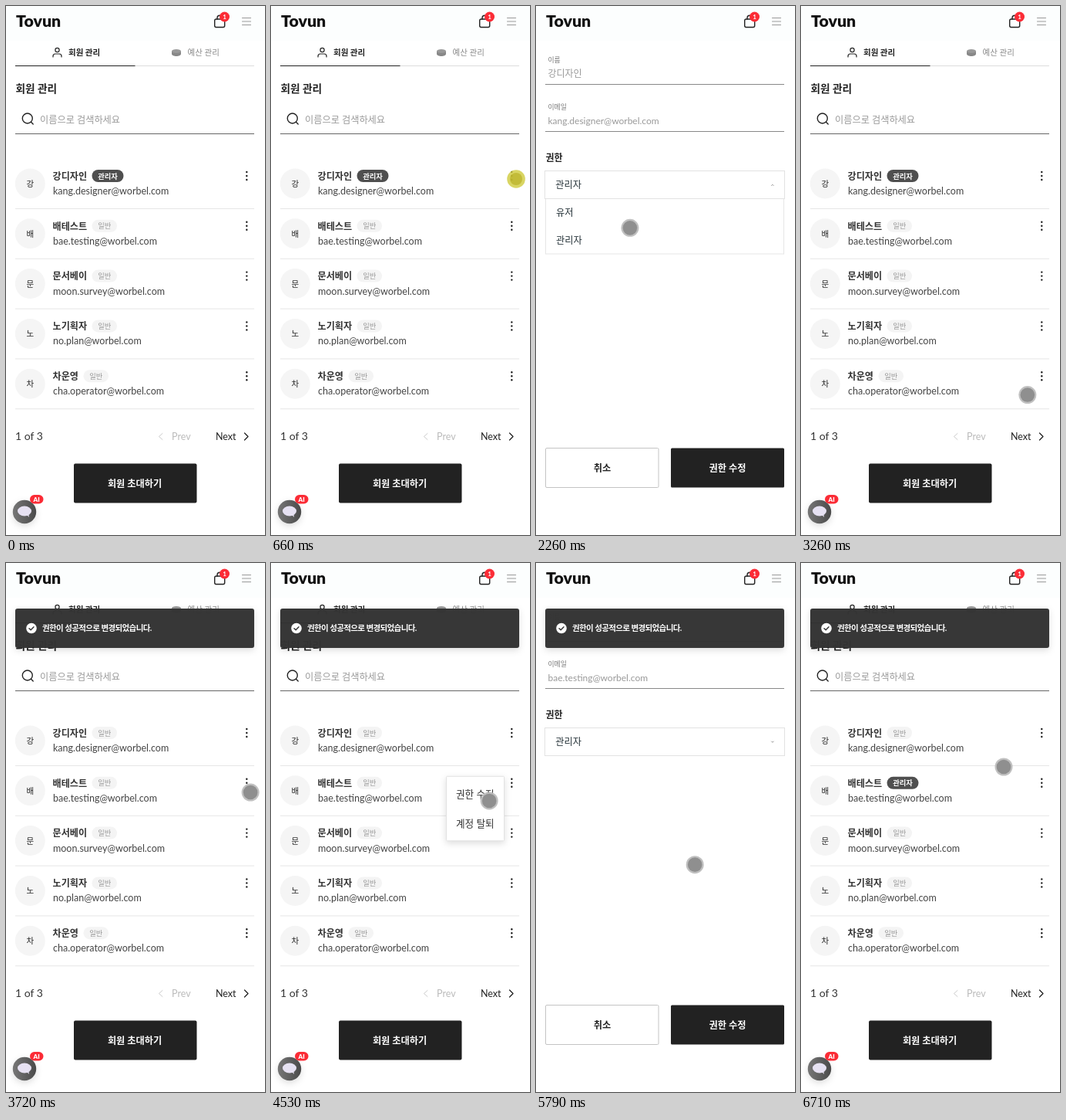
Recreate the animation shown at these times as an HTML page. Size 336 by 685 pixels, loop 7250 ms.

```html
<!DOCTYPE html>
<html lang="ko">
<head>
<meta charset="utf-8">
<title>회원 관리</title>
<style>
html, body { margin: 0; width: 100%; height: 100%; overflow: hidden; background: #fff; }
svg { display: block; width: 100vw; height: 100vh; }
text { font-family: Lato, "Noto Sans CJK KR", "Noto Sans CJK", sans-serif; white-space: pre; }
.soft { filter: drop-shadow(0 3px 4px #0002); }
</style>
</head>
<body>
<svg id="stage" viewBox="0 0 336 685" preserveAspectRatio="none"></svg>
<script>
const LOOP = 7250, TICK = 1000 / 15, PHASE = 188, ROW = 64.8;
const PRESS = 140, SAVE = 340; // length of a click, delay until a new role shows
const ADMIN = '관리자', USER = '유저';
const members = [
  ['강디자인', 'kang.designer'],
  ['배테스트', 'bae.testing'],
  ['문서베이', 'moon.survey'],
  ['노기획자', 'no.plan'],
  ['차운영', 'cha.operator'],
];
const email = i => members[i][1] + '@worbel.com';

// Pointer stops; all but the first and last are clicks.
// Each visit clicks: dots, menu item, select, option, submit.
const stops = [
  [188, 330, 300],
  [600, 318, 224], [1230, 283, 238], [1860, 236, 240], [2440, 118, 289], [2837, 283, 600],
  [4130, 318, 289], [4670, 283, 308], [5080, 230, 240], [5565, 174, 303], [6060, 283, 600],
  [6900, 263, 264],
];
const clickEnds = stops.slice(1, -1).map(([at]) => at + PRESS);
const saves = clickEnds.filter((_, i) => i % 5 === 4).map(at => at + SAVE);
const countPast = (times, t) => times.filter(at => at <= t).length;
const clamp = v => Math.max(0, Math.min(1, v));
const ease = v => v * v * (3 - 2 * v);

const text = (x, y, s, size, fill = '#222', weight = 400, more = '') =>
  `<text x="${x}" y="${y}" font-size="${size}" fill="${fill}" font-weight="${weight}" ${more}>${s}</text>`;
const centred = (x, y, s, size, fill, weight) =>
  text(x, y, s, size, fill, weight, 'text-anchor="middle"');
const rect = (x, y, w, h, fill, r = 0, more = '') =>
  `<rect x="${x}" y="${y}" width="${w}" height="${h}" rx="${r}" fill="${fill}" ${more}/>`;
const circle = (x, y, r, fill, more = '') =>
  `<circle cx="${x}" cy="${y}" r="${r}" fill="${fill}" ${more}/>`;
const line = (d, stroke, width = 1) =>
  `<path d="${d}" fill="none" stroke="${stroke}" stroke-width="${width}" stroke-linecap="round" stroke-linejoin="round"/>`;
const rule = (y, colour, x2 = 322) => rect(12, y, x2 - 12, 1, colour);

const header = () =>
  rect(0, 0, 336, 45, '#fcfefe') +
  text(13, 27, 'Tovun', 21.3, '#111', 900) +
  rect(270.7, 17, 13, 10.5, 'none', 2, 'stroke="#222" stroke-width="1.4"') +
  line('M274 17v-1.5a3.2 3.2 0 0 1 6.4 0v1.5', '#222', 1.4) +
  circle(283.5, 14, 6.5, '#fb2c36') +
  centred(283.5, 16.7, '1', 8, '#fff', 700) +
  line('M306.5 15.500h11M306.5 20h11M306.5 24.5h11', '#999', 1.1);

function badge(x, y, admin) {
  const w = admin ? 41 : 32.5;
  return rect(x, y, w, 16, admin ? '#4f4f4f' : '#f4f4f4', 8) +
    centred(x + w / 2, y + 11.5, admin ? ADMIN : '일반', 9.3, admin ? '#fff' : '#999', admin ? 700 : 400);
}

function memberRow(i, admin) {
  const y = 230 + ROW * i, name = members[i][0];
  return circle(31.3, y, 19.5, '#f5f5f5') +
    centred(31.3, y + 4, name[0], 10.5) +
    text(60.5, y - 5.3, name, 12.1, '#333', 700) +
    badge(name.length > 3 ? 111.5 : 100.5, y - 18, admin) +
    text(61, y + 14, email(i), 12.5, '#444') +
    [-15, -10, -5].map(d => circle(312.3, y + d, 1.2, '#222')).join('') +
    rule(y + 32, '#e6e6e6');
}

const tabs = () =>
  circle(66.5, 57, 2.6, 'none', 'stroke="#222" stroke-width="1.2"') +
  line('M61 66v-1a3 3 0 0 1 3-3h5a3 3 0 0 1 3 3v1', '#222', 1.2) +
  text(81, 64, '회원 관리', 10.5, '#222', 700) +
  '<path d="M215 58.500v3.500c0 4 12 4 12 0v-3.500z" fill="#888"/><ellipse cx="221" cy="58.500" rx="6" ry="2.600" fill="#999"/>' +
  text(235.5, 64, '예산 관리', 10.5, '#888') +
  rule(77, '#ddd') + rule(77, '#222', 167.5);

const search = () =>
  circle(27.8, 145.5, 6.5, 'none', 'stroke="#222" stroke-width="1.4"') +
  line('M32.5 150.2l2.7 2.7', '#222', 1.4) +
  text(44, 151.5, '이름으로 검색하세요', 12.2, '#999') +
  rule(165, '#666');

const pager = () =>
  text(12, 562, '1 of 3', 14, '#333') +
  line('M203 553.5l-4.500 4 4.500 4', '#ccc') +
  text(215, 562, 'Prev', 12.5, '#bbb') +
  text(272, 562, 'Next', 12.5) +
  line('M309.5 553l4.500 4.500-4.500 4.500', '#222', 1.3);

const chat = () =>
  `<g class="soft">${circle(24, 655, 15.2, 'url(#chat)')}</g>` +
  '<ellipse cx="24" cy="654" rx="9" ry="6.500" fill="#e6e1f2"/>' +
  '<path d="M26 658l4 4-1-6z" fill="#e6e1f2"/>' +
  rect(31, 633, 17.5, 11.5, '#fb2c36', 5.7) +
  centred(39.7, 641.7, 'AI', 8, '#fff', 900);

const listPage = saved =>
  tabs() +
  text(12.5, 111.5, '회원 관리', 13.7, '#222', 700) +
  search() +
  members.map((_, i) => memberRow(i, i === 0 ? saved < 1 : i === 1 && saved > 1)).join('') +
  pager() +
  rect(88, 592.5, 159.5, 51, '#222', 2) +
  centred(167, 622.5, '회원 초대하기', 12.2, '#fff', 700) +
  chat();

function menu(row) {
  const y = 211.5 + ROW * row;
  return `<g class="soft">${rect(227.5, y, 75, 83.5, '#fff', 1, 'stroke="#e2e2e2"')}</g>` +
    text(240, y + 27.5, '권한 수정', 12.6, '#333') +
    text(240, y + 65.5, '계정 탈퇴', 12.6, '#333');
}

function editPage(i, role, open) {
  const ink = '#253238';
  const field = (y, label, value) =>
    text(15.5, y, label, 8.8, '#777') + text(15.5, y + 18.5, value, 12, '#999') + rule(y + 28, '#888');
  const options = () =>
    rect(12.5, 249.5, 309, 71.5, '#fff', 0, 'stroke="#e6e6e6"') +
    text(26, 272, USER, 12.2, ink) + text(26, 308, ADMIN, 12.2, ink);
  return field(73, '이름', members[i][0]) +
    field(134, '이메일', email(i)) +
    text(12.5, 200.5, '권한', 12, '#222', 700) +
    (open ? options() : '') +
    rect(11.5, 213.5, 311, 36, '#fff', 0, 'stroke="#e2e2e2"') +
    text(25.3, 235.8, role, 12.2, ink) +
    line(open ? 'M305.5 232.5l1.300-1.300 1.300 1.300' : 'M305.5 231l1.300 1.300 1.300-1.300', '#888', .9) +
    rect(12.5, 572.5, 146.5, 51, '#fff', 1.5, 'stroke="#c4c4c4"') +
    centred(86, 602.5, '취소', 12.2, '#222', 700) +
    rect(175, 572.5, 147, 51, '#222', 1.5) +
    centred(248.5, 602.5, '권한 수정', 12.2, '#fff', 700);
}

function toast(t) {
  const p = clamp((t - saves[0]) / 150);
  return `<g opacity="${p}" transform="translate(0 ${-20 * (1 - p)})">` +
    `<g class="soft">${rect(12, 59, 310, 51, '#333', 3, 'opacity=".98"')}</g>` +
    circle(33, 84.5, 6.8, '#fff') +
    line('M30 84.7l2.200 2.100 3.800-4', '#333', 1.4) +
    text(47, 88, '권한이 성공적으로 변경되었습니다.', 10.5, '#fff', 700, 'letter-spacing="-.6"') + '</g>';
}

function pointer(t) {
  const k = stops.findLastIndex(([at]) => at <= t);
  if (k < 0) return '';
  const [at, x0, y0] = stops[k];
  const [next, x1, y1] = stops[k + 1] || stops[k];
  const start = at + PRESS;
  // Arrives early and rests before the next click
  const f = next > start ? ease(clamp((t - start) / (.65 * (next - start)))) : 0;
  const x = x0 + (x1 - x0) * f, y = y0 + (y1 - y0) * f;
  const pressed = t < start && k > 0 && k < stops.length - 1;
  return pressed
    ? circle(x, y, 11.8, '#cfcb3c', 'opacity=".8"') + circle(x, y, 8, '#b9b128', 'opacity=".7"')
    : circle(x, y, 11.5, '#bdbdbd', 'opacity=".95"') + circle(x, y, 9.3, '#8c8c8c', 'opacity=".95"');
}

function scene(t) {
  const done = countPast(clickEnds, t), saved = countPast(saves, t);
  const visit = Math.floor(done / 5), step = done % 5;
  const role = (visit === 0) === (step < 4) ? ADMIN : USER;
  return '<defs><linearGradient id="chat"><stop stop-color="#777"/><stop offset="1" stop-color="#4a4a4a"/></linearGradient></defs>' +
    rect(0, 0, 336, 685, '#fff') +
    (step > 1 ? editPage(visit, role, step === 3) : listPage(saved)) +
    (step === 1 ? menu(visit) : '') +
    header() +
    (saved ? toast(t) : '') +
    pointer(t);
}

const stage = document.getElementById('stage');
let shown = NaN;
function draw() {
  const t = PHASE + Math.floor((performance.now() % LOOP - PHASE) / TICK) * TICK;
  if (t !== shown) stage.innerHTML = scene(shown = t);
  requestAnimationFrame(draw);
}
draw();
</script>
</body>
</html>
```
